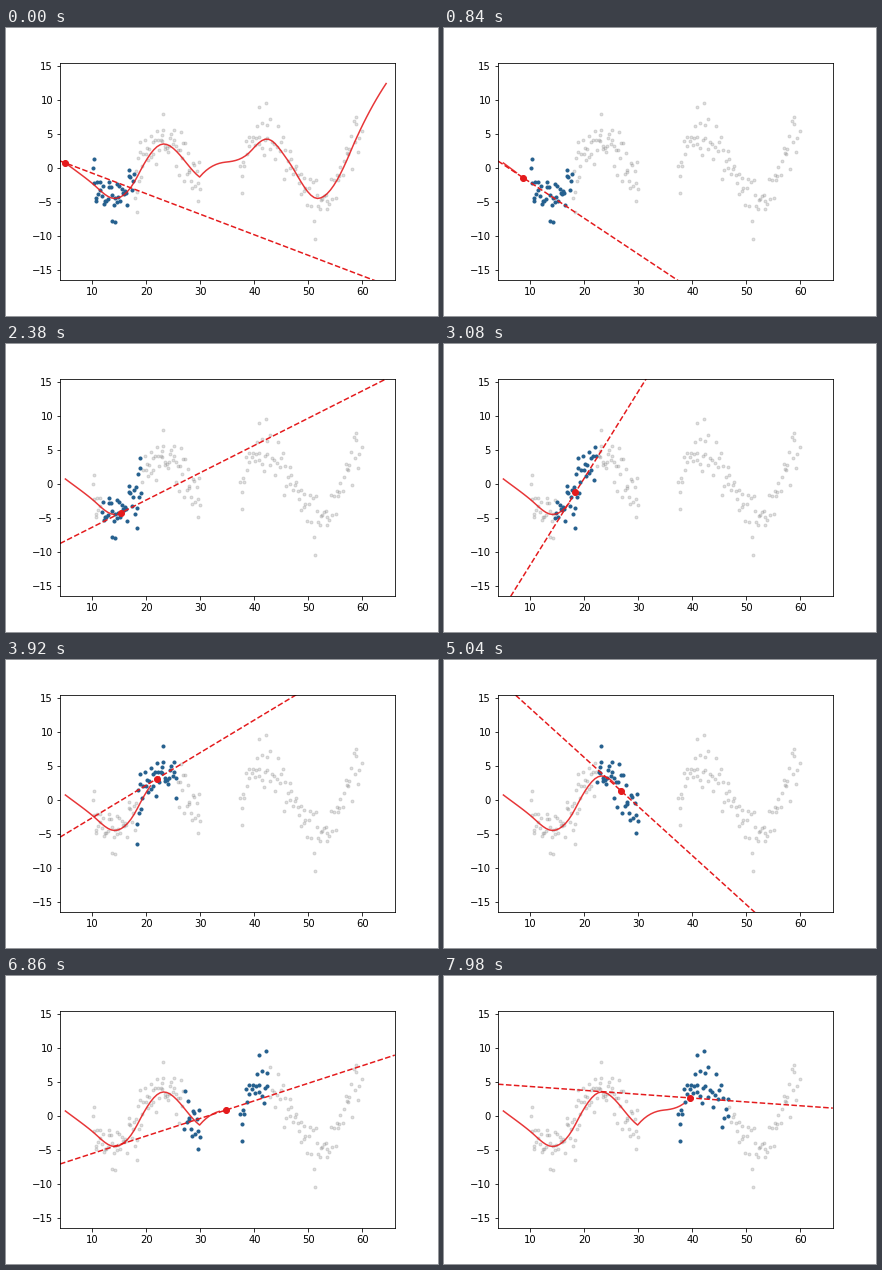
Write a matplotlib script that moves like this. It is 432 by 288 pixels and loops after 8000 ms.

```python
import numpy as np
import matplotlib.pyplot as plt
from matplotlib.animation import FuncAnimation

LOOP, TICK, STEP = 8000, 40, 140  # ms
K = 40                            # neighbours in each local fit
BLUE, RED = "#24608f", "#e41a1c"

# Fitted curve: x, y, slope; the doubled point is a kink
KEYS = np.array([
    (5, .72, -.6), (10, -2.3, -.66), (14.1, -4.5, 0), (18.33, -1.26, 1.55),
    (23.2, 3.52, 0), (29.85, -1.35, -.6), (29.85, -1.35, .95),
    (34.7, .85, .08), (39.55, 2.65, .9), (42.3, 4.25, 0),
    (46.2, 1.09, -1.1), (51.7, -4.5, 0), (57.7, 2.2, 1.9), (64.4, 12.42, 1.2)])

# Tilt of the local line against query position
TILT = np.array([(5, -.302), (9, -.55), (12.88, -.3), (18.33, 1.277),
                 (21.97, .479), (26.82, -.722), (30, -.6), (34.7, .259),
                 (39.55, -.057)])

# The most remote samples
OUTLIERS = np.array([
    (10.3, 1.3), (14.2, -8), (18.3, -6.5), (18.8, 3.8), (23.1, 7.9),
    (29.6, -4.9), (37.7, -3.7), (40.9, 9), (42.1, 9.6), (51.2, -10.4),
    (58.8, 7.5), (60, 5.4)])


def hermite(x):
    kx, ky, km = KEYS.T
    i = np.clip(np.searchsorted(kx, x, side="right") - 1, 0, len(kx) - 2)
    h = kx[i + 1] - kx[i]
    t = (x - kx[i]) / h
    ease = t * t * (3 - 2 * t)
    return (ky[i] + (ky[i + 1] - ky[i]) * ease
            + h * t * (1 - t) * (km[i] * (1 - t) - km[i + 1] * t))


def scatter(rng, lo, hi, n):
    """Evenly spread, jittered samples around the curve."""
    x = lo + (hi - lo) * (np.arange(n) + rng.random(n)) / n
    return np.c_[x, hermite(x) + rng.triangular(-3.8, 0, 3.8, n)]


rng = np.random.default_rng(4)
sx, sy = np.vstack([scatter(rng, 10, 30, 98), scatter(rng, 37.2, 59.5, 86),
                    OUTLIERS]).T
qx = np.linspace(5, 65, 100)[:-1]
fit = hermite(qx)
slope = np.interp(qx, *TILT.T)

fig, ax = plt.subplots(figsize=(6, 4), dpi=72)
fig.subplots_adjust(left=.125, right=.9, bottom=.125, top=.88)
ax.set(xlim=(4, 66), ylim=(-16.5, 15.5))
span = np.array([4, 66])

ax.plot(sx, sy, ".", color="gray", alpha=.25, ms=6)
near, = ax.plot([], [], ".", color=BLUE, ms=6)
curve, = ax.plot([], [], color=RED, alpha=.88, lw=1.5)
line, = ax.plot([], [], "--", color=RED, lw=1.5)
dot, = ax.plot([], [], "o", color=RED, ms=6)


def update(i):
    step = (i * TICK + TICK // 2) // STEP
    x, y = qx[step], fit[step]
    idx = np.argsort(np.abs(sx - x))[:K]
    near.set_data(sx[idx], sy[idx])
    end = step - 1 if step else len(fit)  # starts with the finished curve
    curve.set_data(qx[:end], fit[:end])
    line.set_data(span, y + slope[step] * (span - x))
    dot.set_data([x], [y])
    return near, curve, line, dot


anim = FuncAnimation(fig, update, frames=LOOP // TICK, interval=TICK,
                     repeat=True, repeat_delay=0)
plt.show()
```
